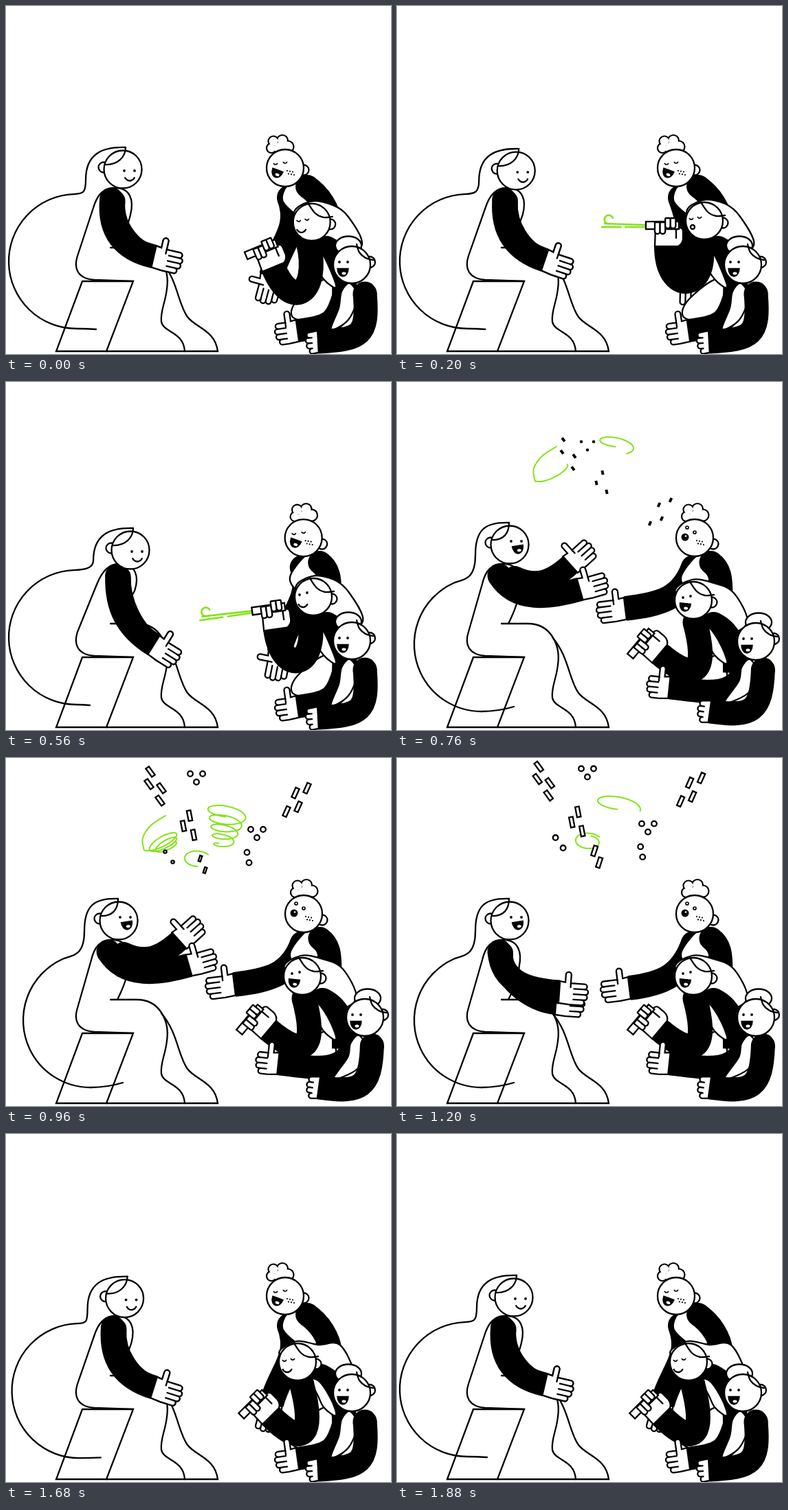
An HTML page with a canvas that plays this animation: 560 px wide and 507 px high, repeating every 1920 ms.

```html
<!DOCTYPE html>
<html lang="en">
<head>
<meta charset="utf-8">
<title>Party</title>
<style>
html, body { margin: 0; width: 100%; height: 100%; overflow: hidden; background: #fff; }
canvas { display: block; }
</style>
</head>
<body>
<canvas id="c" width="560" height="507"></canvas>
<script>
const g = document.getElementById('c').getContext('2d');
const LOOP = 1920, STEP = 40, RAD = Math.PI / 180;
const GREEN = '#84e21a';
let now = 0;

const clamp = (v) => Math.max(0, Math.min(1, v));
const ramp = (a, b) => clamp((now - a) / (b - a));
const easeOut = (u) => 1 - (1 - u) ** 3;
const smooth = (u) => u * u * (3 - 2 * u);
const within = (a, b) => now >= a && now < b;
const mix = (a, b, k) => a.map((v, i) => v + (b[i] - v) * k);

// How far each gesture has come, 0 to 1.
function gestures() {
  return {
    lean: smooth(ramp(0, 560)) * (1 - smooth(ramp(1240, 1880))),
    cheer: easeOut(ramp(580, 760)) * (1 - smooth(ramp(1230, 1480))),
    sway: easeOut(ramp(580, 760)) * (1 - smooth(ramp(1400, 1800))),
    clap: smooth(ramp(960, 1180)),
    rise: smooth(ramp(280, 580)) * (1 - smooth(ramp(1280, 1660))),
    swing: Math.sin(Math.PI * ramp(40, 600)),
    lift: (0.5 + 0.5 * easeOut(ramp(0, 220))) * (1 - ramp(580, 740)),
    sink: ramp(400, 560)
  };
}

function paint(fill = '#fff') {
  g.fillStyle = fill;
  g.fill();
  g.stroke();
}

// Smooth curve through a flat list of points.
function trace(p, closed) {
  const n = p.length / 2;
  const pt = (i) => {
    const k = 2 * (closed ? (i + n) % n : Math.max(0, Math.min(n - 1, i)));
    return [p[k], p[k + 1]];
  };
  g.beginPath();
  g.moveTo(p[0], p[1]);
  for (let i = 0; i < (closed ? n : n - 1); i++) {
    const a = pt(i - 1), b = pt(i), c = pt(i + 1), d = pt(i + 2);
    g.bezierCurveTo(b[0] + (c[0] - a[0]) / 6, b[1] + (c[1] - a[1]) / 6,
      c[0] - (d[0] - b[0]) / 6, c[1] - (d[1] - b[1]) / 6, c[0], c[1]);
  }
}

function blob(p) { trace(p, true); paint(); }
function line(p) { trace(p); g.stroke(); }

function disc(x, y, r, fill) {
  g.beginPath();
  g.arc(x, y, r, 0, 7);
  paint(fill);
}

function dot(x, y, r, fill = '#000') {
  g.beginPath();
  g.arc(x, y, r, 0, 7);
  g.fillStyle = fill;
  g.fill();
}

function local(x, y, a, draw) {
  g.save();
  g.translate(x, y);
  g.rotate(a);
  draw();
  g.restore();
}

// A sleeve leaves the shoulder at one angle and meets the wrist at another.
function sleeve(sx, sy, [out, wx, wy, into], bend, w = 35) {
  const o = out * RAD, a = into * RAD;
  g.save();
  g.lineWidth = w;
  g.lineCap = 'butt';
  g.beginPath();
  g.moveTo(sx, sy);
  g.bezierCurveTo(sx + bend * Math.cos(o), sy + bend * Math.sin(o),
    wx - bend * Math.cos(a), wy - bend * Math.sin(a), wx, wy);
  g.stroke();
  g.restore();
  dot(sx, sy, w / 2);
  return [wx, wy, a];
}

function hand([x, y, a], flip, len = 42, thumb = true) {
  local(x, y, a, () => {
    if (flip) g.scale(1, -1);
    const h = 7.8, r = h / 2, tips = [len - 2, len, len - 1, len - 5];
    g.beginPath();
    g.moveTo(0, -16);
    if (thumb) {
      g.lineTo(8, -15);
      g.lineTo(8, -26);
      g.arc(12, -26, 4, Math.PI, 0);
      g.lineTo(16, -14);
    }
    tips.forEach((tip, i) => g.arc(tip - r, -14 + h * i + r, r, -Math.PI / 2, Math.PI / 2));
    g.lineTo(Math.min(15, len / 2), 17.2);
    g.lineTo(0, 16);
    g.closePath();
    paint();
    g.beginPath();
    for (let i = 1; i < 4; i++) {
      g.moveTo(len * 0.5, -14 + h * i);
      g.lineTo(tips[i] - r, -14 + h * i);
    }
    if (thumb) {
      g.moveTo(16, -14);
      g.lineTo(16, -8);
    }
    g.stroke();
  });
}

function blower(len) {
  g.strokeStyle = GREEN;
  g.lineWidth = 2.6;
  const x = -31 - len, y = -32;
  g.beginPath();
  g.moveTo(-31, y + 1);
  g.lineTo(x + 4, y - 1);
  g.moveTo(x, y + 4);
  g.lineTo(x + len * 0.44, y + 4);
  g.moveTo(x + len * 0.54, y + 4);
  g.lineTo(-31, y + 4);
  g.stroke();
  g.beginPath();
  g.arc(x + 10, y - 7, 6.3, -20 * RAD, 95 * RAD, true);
  g.stroke();
}

// A fist around the party horn.
function grip([x, y, a]) {
  local(x, y, a + Math.PI / 2, () => {
    const len = 76 * easeOut(ramp(120, 300)) * (1 - ramp(580, 700));
    if (len > 6) { g.save(); blower(len); g.restore(); }
    g.beginPath();
    g.moveTo(-17, 0);
    g.lineTo(-16, -26);
    g.lineTo(14, -27);
    g.arc(19, -22, 5, -Math.PI, 0);
    g.lineTo(24, -10);
    g.quadraticCurveTo(23, -3, 17, 0);
    g.closePath();
    paint();
    g.beginPath();
    g.moveTo(14, -22);
    g.lineTo(14, -12);
    g.stroke();
    g.beginPath();
    g.rect(-30, -36, 48, 11);
    paint();
    for (let i = 0; i < 4; i++) {
      g.beginPath();
      g.roundRect(-17 + i * 7.6, i > 1 ? -41 : -35, 7.6, i > 1 ? 15 : 17, [1, 1, 3.5, 3.5]);
      paint();
    }
  });
}

function grin(x, y, tilt = 0) {
  local(x, y, tilt, () => {
    g.beginPath();
    g.ellipse(0, -4, 7.5, 10.5, 0, 0, Math.PI);
    g.closePath();
    paint('#000');
    g.beginPath();
    g.ellipse(1.5, 2.5, 3, 2, 0, 0, 7);
    g.fillStyle = '#fff';
    g.fill();
  });
}

function smile(x, y, r = 7.5) {
  g.beginPath();
  g.arc(x, y - 4, r, 25 * RAD, 155 * RAD);
  g.stroke();
}

function lids(x, y, gap = 12) {
  g.save();
  g.lineWidth = 1.7;
  for (const i of [0, 1]) {
    g.beginPath();
    g.arc(x + gap * i, y - 2 - 2 * i, 3, 0.5, 2.6);
    g.stroke();
  }
  g.restore();
}

function eyes(x, y, gap, drop = 0) {
  dot(x, y, 1.9);
  dot(x + gap, y + drop, 1.9);
}

function cloud(x, y) {
  const puffs = [[-12, 5, 7], [-9, -5, 7.5], [4, -6, 8], [12, 3, 8.5], [0, 5, 9]];
  for (const [dx, dy, r] of puffs) dot(x + dx, y + dy, r + 1.1);
  for (const [dx, dy, r] of puffs) dot(x + dx, y + dy, r - 1.1, '#fff');
}

function drawSeat() {
  g.beginPath();
  g.moveTo(111, 401);
  g.lineTo(185, 401);
  g.lineTo(146, 503);
  g.lineTo(73, 503);
  g.closePath();
  paint();
}

function drawLegs() {
  g.beginPath();
  g.moveTo(226, 372);
  g.bezierCurveTo(250, 400, 250, 434, 264, 453);
  g.bezierCurveTo(276, 469, 304, 472, 308, 503);
  g.lineTo(146, 503);
  g.stroke();
  g.beginPath();
  g.moveTo(152, 352);
  g.lineTo(190, 352);
  g.bezierCurveTo(225, 352, 238, 385, 234, 412);
  g.bezierCurveTo(232, 432, 224, 445, 226, 460);
  g.bezierCurveTo(229, 476, 258, 474, 260, 503);
  g.stroke();
}

function drawSeated({ lean, cheer, sway, clap }) {
  const [hx, hy] = mix(mix([170, 238], [181, 245], lean), [164, 237], cheer);
  const tx = hx + 4 - 5 * cheer, ty = hy - 32;
  drawSeat();
  drawLegs();

  // long hair ending in a wide loop
  const R = 98, a = (-92 - 23 * cheer) * RAD, strand = hx - 54 + 4 * cheer;
  const [cx, cy, ex, ey] = mix([102, 372, 131 - 9 * lean, 471], [123, 382, 170, 473], sway);
  const px = cx + R * Math.cos(a), py = cy + R * Math.sin(a);
  g.beginPath();
  g.moveTo(tx, ty);
  g.bezierCurveTo(tx - 35, ty - 1, strand, hy - 22, strand, hy + 15);
  g.bezierCurveTo(strand, py - 2, px - 14 * Math.sin(a), py + 14 * Math.cos(a), px, py);
  g.arc(cx, cy, R, a, Math.PI / 2, true);
  g.quadraticCurveTo((cx + ex) / 2, cy + R, ex, ey);
  g.stroke();

  const d = (hx - 170) * 0.7;
  g.beginPath();
  g.moveTo(185, 401);
  g.lineTo(128, 399);
  g.bezierCurveTo(104, 397, 98, 382, 104, 364);
  g.lineTo(127 + d * 0.7, 294);
  g.bezierCurveTo(133 + d, 274, 142 + d, 266, 156 + d, 265);
  g.bezierCurveTo(182 + d, 264, 186 + d, 284, 181 + d * 0.8, 304);
  g.quadraticCurveTo(177, 322, 162, 352);
  g.stroke();

  const rest = mix([95, 215, 365, 13], [92, 215, 383, 32], lean);
  const front = mix(rest, mix([58, 266, 302, -16], [85, 236, 341, 4], clap), cheer);
  const back = mix(rest, mix([25, 252, 266, -42], [95, 231, 358, 4], clap), cheer);
  const sx = hx * 0.75 + 26;
  hand(sleeve(sx + 4 + 18 * cheer * (1 - clap), 284, back, 36, 32), false);
  hand(sleeve(sx, 282, front, 46), false);

  disc(hx - 28, hy - 3, 7.5);
  disc(hx, hy, 27.5);
  g.beginPath();
  g.moveTo(tx, ty);
  g.bezierCurveTo(tx, hy - 18, hx - 8, hy - 6, hx - 26, hy - 7);
  g.stroke();
  if (within(620, 1640)) {
    const low = 6 * (1 - cheer);
    eyes(hx + 2, hy - 5 + low, 15);
    grin(hx + 12, hy + 6 + low, -0.15);
  } else {
    eyes(hx + 2, hy + 2, 15);
    smile(hx + 10, hy + 13);
  }
}

function drawTop({ rise, cheer, swing, clap }) {
  const [hx, hy] = mix([406, 236], [433, 227], rise);
  const hang = [70, 386 + 52 * swing, 393 + 3 * swing, 105 - 17 * swing];
  const reach = [110, 332 + 6 * clap, 330 + 5 * clap, 173];
  hand(sleeve(hx + 6 - 8 * rise, hy + 43, mix(hang, reach, cheer), 50, 36), true);
  blob([hx + 3, hy + 26, hx * 0.4 + 240, 284, 424, 306, 438, 316, 452, 300, hx + 22, hy + 24]);
  sleeve(hx * 0.68 + 162, 263, [35, 472, 318, 85], 22, 34);
  cloud(hx - 8 + 8 * rise, hy - 34 - 2 * rise);
  disc(hx + 27, hy + 3 + 6 * rise, 7.5);
  disc(hx, hy, 27);
  for (let i = 0; i < 6; i++) {
    const row = i % 2;
    dot(hx + 3 + i * 2, hy + 4 + row * 4 + i * 0.4, 1.1);
  }
  if (within(640, 1680)) {
    g.save();
    g.lineWidth = 1.7;
    disc(hx - 11, hy - 15, 2);
    disc(hx, hy - 8, 2);
    g.restore();
    dot(hx - 14, hy - 1, 5.5);
    dot(hx - 13, hy - 2.5, 1.3, '#fff');
  } else {
    lids(hx - 14, hy - 6, 14);
    grin(hx - 12, hy + 7, 0.35);
  }
}

function drawMid({ lift, sink, cheer }) {
  const [hx, hy] = mix(mix([424, 332], [447, 313], Math.min(1, lift * 1.8)), [431, 318], cheer);
  const end = hx * 0.6 + 251;
  blob([hx - 26, hy - 11, hx - 2, hy - 30, hx + 30, hy - 25, end - 20, 307, end, 348, 485, 365, 450, 345]);
  blob([424, 428, 465, 398, 480, 425, 472, 450, 442, 459, 416, 452]);
  sleeve(hx * 0.4 + 288, 353, [25, 492, 424, 92], 30, 36);
  blob([hx - 2, hy + 26, hx * 0.3 + 325, 358, 472, 385, 480, 410, 462, 398, 448, 372]);
  const blow = [80, 392, 350 + 10 * sink, -90 - 8 * sink];
  const arm = mix(mix([75, 385, 411, -135], blow, lift), [75, 382, 396, -140], cheer);
  grip(sleeve(hx * 0.5 + 218, hy + 32, arm, 72, 36));
  disc(hx + 27, hy + 3, 7.5);
  disc(hx, hy, 27);
  line([hx - 5, hy - 27, hx + 5, hy - 13, hx + 17, hy - 7, hx + 30, hy - 8]);
  if (within(160, 480)) {
    lids(hx - 19, hy - 3);
    disc(hx - 17, hy + 9, 3);
  } else if (within(480, 640)) {
    eyes(hx - 20, hy - 3, 11, -3);
    smile(hx - 15, hy + 12, 7);
  } else if (within(640, 1600)) {
    eyes(hx - 15, hy - 4, 11, -2);
    grin(hx - 12, hy + 9, 0.1);
  } else {
    lids(hx - 19, hy - 2);
    smile(hx - 15, hy + 12, 7);
  }
}

function drawLow({ cheer }) {
  const hx = 503 + 19 * cheer, hy = 377 + cheer, d = 13 * cheer, up = 4 * cheer;
  const thumb = mix([105, 424, 473, 172], [110, 396, 445, 186], cheer);
  const rest = mix([85, 454, 489, 177], [92, 455, 480, 188], cheer);
  const cuff = sleeve(492 + d, 420, thumb, 46, 34);
  blob([500 + d, 404, 511 + d, 424, 498 + d, 457 - up, 473 + d * 0.3, 471 - up, 484 + d, 440 - up, 488 + d, 416]);
  hand(cuff, true, 33);
  hand(sleeve(522 + d * 0.8, 419, rest, 62), true, 18, false);
  g.beginPath();
  g.ellipse(hx - 5 + 9 * cheer, hy - 28, 19, 13.5, 0, 0, 7);
  paint();
  disc(hx + 26, hy - 4, 8);
  disc(hx, hy, 27);
  line([hx + 7, hy - 30, hx + 11, hy - 18, hx + 20, hy - 10, hx + 31, hy - 7]);
  eyes(hx - 18, hy - 4, 12);
  grin(hx - 13, hy + 10);
}

// Shrinking loops around a moving centre.
function coil(x, y, dx, dy, rx, ry, shrink, tilt, start, turns) {
  const p = [], n = Math.ceil(Math.abs(turns) * 24);
  const c = Math.cos(tilt * RAD), s = Math.sin(tilt * RAD);
  for (let i = 0; i <= n; i++) {
    const u = i / n, a = (start + 360 * turns * u) * RAD, k = 1 - shrink * u;
    const ex = rx * k * Math.cos(a), ey = ry * k * Math.sin(a);
    p.push(x + dx * u + ex * c - ey * s, y + dy * u + ex * s + ey * c);
  }
  return p;
}

// Strokes a curve between two shares of its points.
function ribbon(p, from, to) {
  const n = p.length / 2 - 1;
  const part = p.slice(2 * Math.round(from * n), 2 * Math.round(to * n) + 2);
  if (part.length < 4) return;
  g.save();
  g.strokeStyle = GREEN;
  g.lineWidth = 2;
  line(part);
  g.restore();
}

// Pieces shoot up, slow down and vanish; spots are offsets from the centre.
function burst(x, y, dx, dy, start, spots, draw) {
  const size = clamp((now - start) / 140) * (1 - ramp(1240, 1360));
  if (size <= 0) return;
  const k = Math.min(9, Math.exp((960 - now) / 90));
  for (const [ox, oy] of spots) local(x + ox + dx * k, y + oy + dy * k, 0, () => draw(size));
}

const strip = (tilt) => (k) => {
  g.rotate(tilt * RAD);
  g.beginPath();
  g.rect(-2.8 * k, -7.5 * k, 5.6 * k, 15 * k);
  paint();
};
const ring = (k) => disc(0, 0, 3.8 * k);
const pair = (x, y) => [[x, y], [-x, -y]];
const quad = (x, y, u, v) => pair(x + u, y + v).concat(pair(x - u, y - v));
const triad = [[-9, -4], [9, -4], [0, 8]];

function drawConfetti() {
  if (!within(680, 1400)) return;
  const rise = (now - 960) / 240, grow = 1 + 0.13 * rise;

  ribbon(coil(323 + 2 * rise, 75 - 12 * rise, -8, 54, 30 * grow, 11 * grow, 0.58, 8, 95, 4.4),
    0, ramp(720, 920) * (1 - 0.83 * ramp(960, 1200)) * (1 - ramp(1200, 1300)));

  const y = -12 * rise;
  const loops = coil(224, 120 + y, 12, 10, 27, 9, 0.5, -28, 175, -2.6);
  ribbon([232, 84 + y, 211, 98 + y, 199, 116 + y, ...loops], ramp(980, 1160), ramp(720, 900));

  ribbon(coil(278, 121 + 26 * (1 - clamp(rise)), 0, 1, 20, 12, 0.25, 5, -40, -1.1),
    ramp(1200, 1340), 0.6 * ramp(860, 960) + 0.4 * ramp(960, 1120));

  burst(213, 33, 4, 8, 720, quad(8, 12, 1, -9), strip(-36));
  burst(428, 45, -5, 16, 720, quad(6.5, -13.5, 8.5, -3.5), strip(24));
  burst(261, 91, 4, 6, 720, [[2, -13], [-7, 2], [8, 15]], strip(-11));
  burst(291, 143, -5, 12, 880, pair(3.5, 8.5), strip(18));
  burst(277, 19, 0, 8, 720, triad, ring);
  burst(365, 99, 0, 9, 760, triad, ring);
  burst(356, 136, -4, 9, 820, pair(1.5, 7.5), ring);
  burst(236, 122, 1, 22, 880, pair(5.5, 7.5), ring);
}

function frame(ms) {
  now = Math.floor((ms % LOOP) / STEP) * STEP;
  g.fillStyle = '#fff';
  g.fillRect(0, 0, 560, 507);
  g.strokeStyle = '#000';
  g.lineWidth = 2.3;
  g.lineCap = 'round';
  const move = gestures();
  drawSeated(move);
  drawTop(move);
  drawMid(move);
  drawLow(move);
  drawConfetti();
}

const begin = performance.now();
function tick() {
  frame(performance.now() - begin);
  requestAnimationFrame(tick);
}
tick();
</script>
</body>
</html>
```
